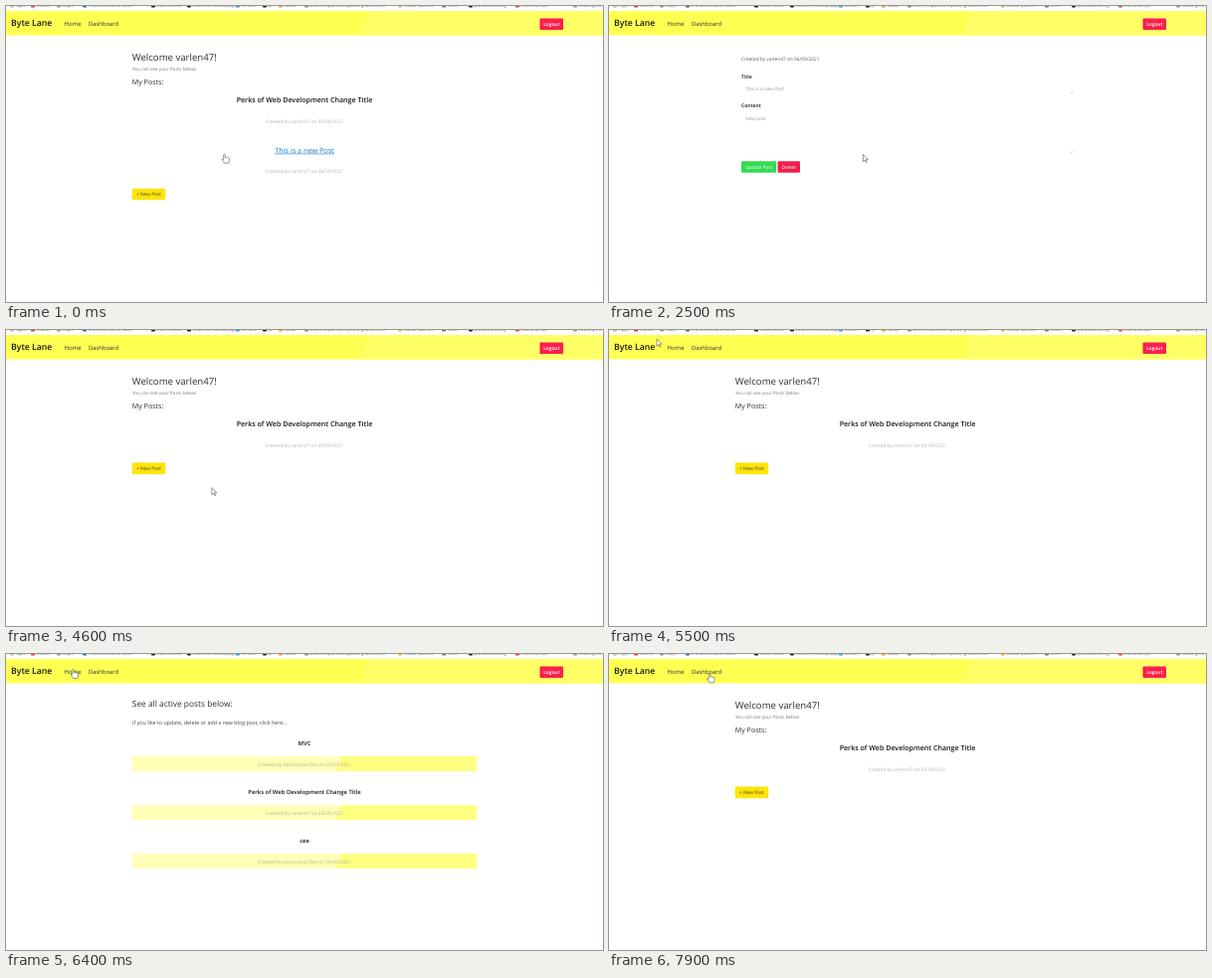
An HTML page that plays this animation: 600x298 px, repeating every 8000 ms.

```html
<!DOCTYPE html>
<html lang="en">
<head>
<meta charset="utf-8">
<title>Blog dashboard</title>
<style>
  html, body { margin: 0; width: 100%; height: 100%; overflow: hidden; background: #fff; }
  svg { display: block; width: 100vw; height: 100vh; }
  text { font-family: "Open Sans", "Noto Sans", sans-serif; text-rendering: geometricPrecision; white-space: pre; }
</style>
</head>
<body>
<svg id="stage" viewBox="0 0 600 298" xmlns="http://www.w3.org/2000/svg"></svg>
<script>
const NS = "http://www.w3.org/2000/svg";
const LOOP = 8000, STEP = 100;
const USER = "varlen47", AUTHOR = "mirel.juniorDev";
const INK = "#2b2f33", DARK = "#161616", PALE = "#b4b4b4";
const stage = document.getElementById("stage");

function add(parent, tag, attrs, content) {
  const el = document.createElementNS(NS, tag);
  for (const key in attrs) el.setAttribute(key, attrs[key]);
  if (content) el.textContent = content;
  parent.appendChild(el);
  return el;
}
const group = parent => add(parent, "g", {});
const box = (parent, x, y, w, h, fill, rx = 0) =>
  add(parent, "rect", { x, y, width: w, height: h, fill, rx });
function label(parent, content, x, y, size, fill = INK, weight = 400, anchor = "start") {
  return add(parent, "text", {
    x, y, fill, "font-size": size, "font-weight": weight, "text-anchor": anchor
  }, content);
}
function button(parent, content, x, y, w, h, fill, ink, weight = 400) {
  box(parent, x, y, w, h, fill, 1);
  label(parent, content, x + w / 2, y + h / 2 + 1.8, 4.8, ink, weight, "middle");
}
// Two-tone strip split at 60% along a slanted edge
function strip(parent, x, y, w, h, left, right) {
  const mid = x + w * 0.6, lean = h * 0.18;
  box(parent, x, y, w, h, left);
  add(parent, "path", {
    d: `M${mid + lean} ${y}H${x + w}V${y + h}H${mid - lean}Z`, fill: right
  });
}
const byline = (name, day) => `Created by ${name} on ${day}/09/2021`;

function drawBookmarks() {
  const marks = [
    [4, "#bbb", "Apps"], [25, "#e33", "Videos"], [51, "#999", "Maps"],
    [77, "#3a6ea8", "Frontend course notes"], [146, "#222", "Code review"],
    [182, "#222", "Read the manual page"], [231, "#2aa5d8", "Stream"],
    [258, "#222", "js"], [274, "#f0a020", "Guide"],
    [300, "#888", "Learn responsive layouts, grid and flex"],
    [394, "#f5b83d", "Colour palettes"], [438, "#777", "Icons"],
    [465, "#222", "Job board listing"], [512, "#e43", "Interview tips"],
    [570, "#999", "Reading list"]
  ];
  for (const [x, fill, name] of marks) {
    box(stage, x, -2, 4, 3.6, fill, 1);
    label(stage, name, x + 6, 1.2, 4.2, "#777");
  }
}

function drawHeader() {
  drawBookmarks();
  strip(stage, 0, 5, 600, 24.5, "#ffff52", "#ffff66");
  label(stage, "Byte Lane", 5, 20, 8.7, DARK, 600);
  label(stage, "Home", 58.5, 19.8, 6);
  label(stage, "Dashboard", 83, 19.8, 5.85);
  button(stage, "Logout", 536.5, 12.5, 23.5, 11.5, "#fb1f4d", "#fff", 600);
}

function makeDashboard(withSecond) {
  const page = group(stage);
  label(page, `Welcome ${USER}!`, 126.8, 54.8, 9.6, INK, 500);
  label(page, "You can see your Posts below:", 127, 64.9, 4.65, "#777");
  label(page, "My Posts:", 126.8, 79.2, 7.1, INK, 500);
  label(page, "Perks of Web Development Change Title", 300, 97, 7.1, DARK, 600, "middle");
  label(page, byline(USER, "05"), 300, 117.9, 4.8, PALE, 400, "middle");
  if (withSecond) {
    page.link = label(page, "This is a new Post", 300, 147.5, 7.1, DARK, 600, "middle");
    page.line = box(page, 270, 148.6, 60, 0.6, "#0a78d0");
    label(page, byline(USER, "06"), 300, 168.3, 4.8, PALE, 400, "middle");
  }
  button(page, "+ New Post", 126.8, withSecond ? 183.7 : 133.6, 33.4, 11.6, "#ffe40a", "#4a4420");
  return page;
}

function makeEditor() {
  const page = group(stage);
  label(page, byline(USER, "06"), 133, 54.7, 4.8, "#5a5a5a");
  label(page, "Title", 133, 72.7, 5.1, DARK, 600);
  label(page, "This is a new Post", 137, 85, 4.75, "#999");
  label(page, "Content", 133, 102.4, 5.1, DARK, 600);
  label(page, "New post", 137, 114.8, 4.75, "#999");
  for (const y of [88, 148])
    add(page, "path", { d: `M464 ${y}l2 -2M465.2 ${y}l.8 -.8`, stroke: "#999", "stroke-width": 0.4 });
  button(page, "Update Post", 133, 156.2, 35.2, 11.6, "#31dc50", "#fff");
  button(page, "Delete", 169.6, 156.2, 22.4, 11.6, "#f01f4b", "#fff");
  return page;
}

function makeHome() {
  const page = group(stage);
  label(page, "See all active posts below:", 126.8, 53.4, 8.4, INK, 500);
  label(page, "If you like to update, delete or add a new blog post, click here...", 127, 71.4, 5.33, "#444");
  const posts = [["MVC", AUTHOR], ["Perks of Web Development Change Title", USER], ["cee", AUTHOR]];
  posts.forEach(([title, name], i) => {
    const y = 49 * i;
    label(page, title, 300, 91.6 + y, 5.9, DARK, 600, "middle");
    strip(page, 127, 103 + y, 346, 15, "#ffffb8", "#ffff80");
    label(page, byline(name, "05"), 300, 112.5 + y, 4.8, "#b3b38e", 400, "middle");
  });
  return page;
}

drawHeader();
const pages = {
  full: makeDashboard(true), edit: makeEditor(),
  short: makeDashboard(false), home: makeHome()
};
const schedule = [[0, "full"], [2500, "edit"], [3600, "short"], [6400, "home"], [7900, "short"]];

const pointer = group(stage);
const ink = { fill: "#fff", stroke: "#444", "stroke-width": 0.55, "stroke-linejoin": "round" };
const arrow = add(pointer, "path", { ...ink, d: "M0 0V7.2L1.7 5.7L2.8 8.2L3.9 7.7L2.8 5.3H5Z" });
const hand = add(pointer, "path", {
  ...ink,
  d: "M-.8 .6Q0 -.4 .8 .6V3.4Q1.6 2.7 2.3 3.6Q3.1 3 3.7 3.9Q4.8 3.5 5 4.6V6.6Q4.9 8 4.1 9.2H-.1Q-.7 7.8 -2.6 5.7Q-2.6 4.5 -.8 5.7Z"
});

// time, x, y of the pointer tip
const path = [
  [0, 219.5, 149], [500, 219.5, 149], [800, 240, 208], [900, 240, 208],
  [1200, 256, 245], [1800, 262, 148], [2400, 262, 148], [2700, 242, 152],
  [2900, 242, 152], [3200, 178, 155], [3400, 180, 159], [3500, 180, 159],
  [3800, 206.5, 163], [4500, 206.5, 163], [4600, 206.8, 158.6],
  [5400, 97, 30], [5500, 48, 9], [6100, 67.5, 15.3],
  [6700, 67.5, 15.3], [7500, 101, 19.6], [LOOP, 101, 19.6]
];

function tipAt(t) {
  const i = path.findIndex((p, n) => n > 0 && t <= p[0]);
  const [t0, x0, y0] = path[i - 1], [t1, x1, y1] = path[i];
  const k = (t - t0) / (t1 - t0);
  return [x0 + (x1 - x0) * k, y0 + (y1 - y0) * k];
}
const inside = (x, y, l, t, r, b) => x >= l && x <= r && y >= t && y <= b;

function render(time) {
  const t = Math.floor((time % LOOP) / STEP) * STEP;
  const name = schedule.filter(s => s[0] <= t).pop()[1];
  for (const key in pages) pages[key].style.display = key === name ? "" : "none";

  const [x, y] = tipAt(t);
  const onPost = name === "full" && inside(x, y, 127, 140, 473, 156);
  const onDelete = name === "edit" && inside(x, y, 169.6, 156.2, 192, 168);
  const onNav = inside(x, y, 58, 13, 77, 23) || inside(x, y, 82, 13, 114, 23);
  pages.full.link.setAttribute("fill", onPost ? "#0a78d0" : DARK);
  pages.full.link.setAttribute("font-weight", onPost ? 500 : 600);
  pages.full.link.setAttribute("font-size", onPost ? 7.25 : 7.1);
  pages.full.line.style.display = onPost ? "" : "none";

  const pointing = onPost || onDelete || onNav;
  hand.style.display = pointing ? "" : "none";
  arrow.style.display = pointing ? "none" : "";
  pointer.setAttribute("transform", `translate(${x} ${y})`);
}

const start = performance.now();
function tick() {
  render(performance.now() - start);
  requestAnimationFrame(tick);
}
tick();
</script>
</body>
</html>
```
